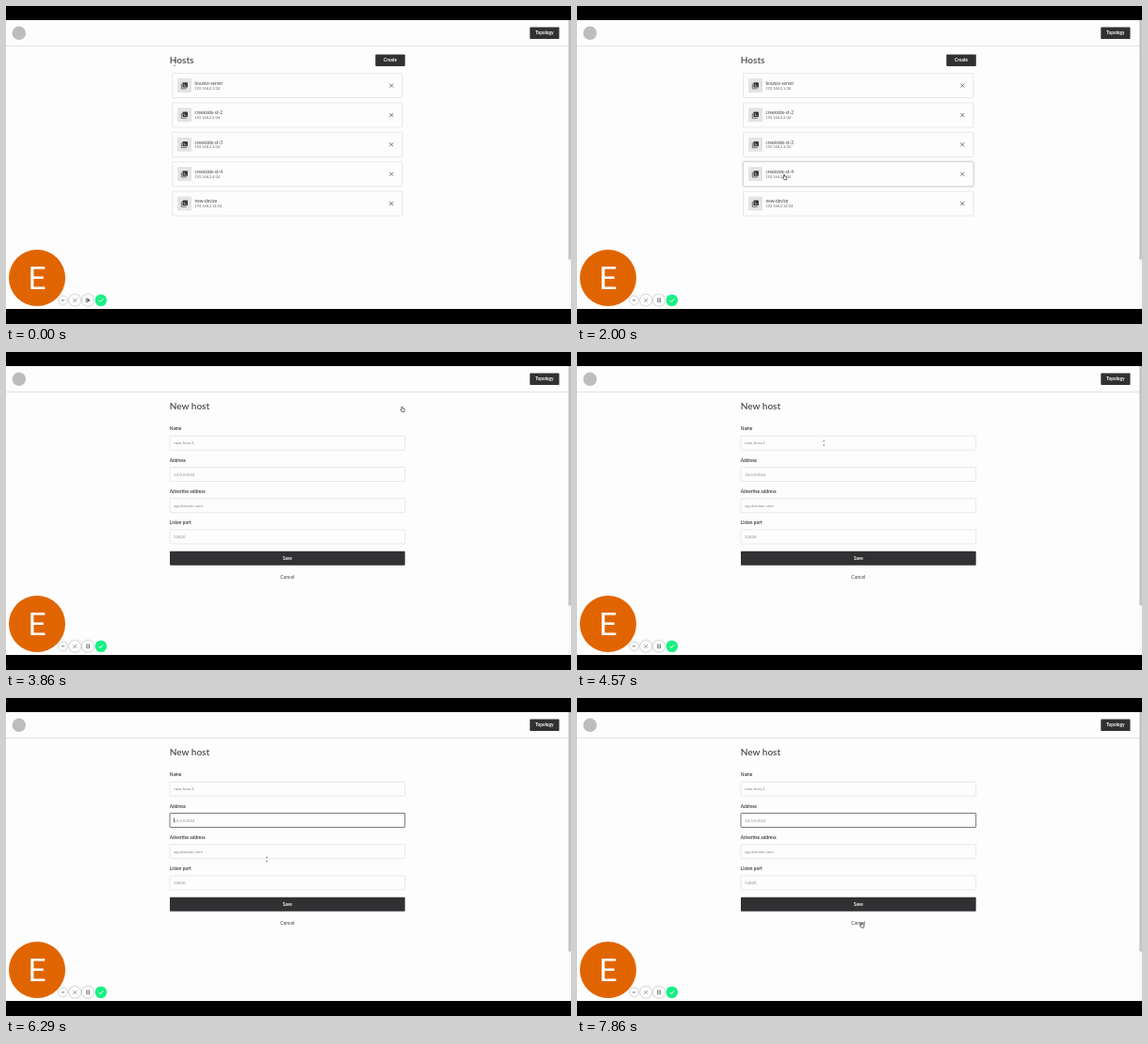
An HTML page that plays this animation: 600x338 px, repeating every 8000 ms.

```html
<!DOCTYPE html>
<html lang="en">
<head>
<meta charset="utf-8">
<title>Host manager</title>
<style>
  html, body { margin: 0; width: 100%; height: 100%; overflow: hidden; background: #000; }
  svg { display: block; width: 600px; height: 338px; }
  text { font: 4.7px Lato, sans-serif; fill: #444; }
  .heading { font-size: 10px; font-weight: 600; fill: #4a4a4c; }
  .sub { font-size: 3.85px; fill: #666; }
  .button { fill: #313032; }
  .caption { font-weight: 700; fill: #fff; text-anchor: middle; }
  .label { font-size: 4.8px; font-weight: 600; fill: #333; }
  .hint { font: 4.4px "Liberation Sans", sans-serif; fill: #858585; }
  .card, .field { fill: #fefdfe; stroke: #e4e4e5; stroke-width: .8; }
  .card.on { stroke: #d2d2d4; filter: drop-shadow(0 .6px .8px #0003); }
  .field.on { stroke: #555; }
  .knob { fill: #fff; filter: drop-shadow(0 .4px 1px #0006); }
  .line { fill: none; stroke: #555; stroke-width: .8; }
</style>
</head>
<body>
<svg id="stage" viewBox="0 0 600 338"></svg>
<script>
const LOOP = 8000, STEP = 1000 / 7;
const CARD_TOP = 71.6, CARD_PITCH = 31.35, CARD_HEIGHT = 26;
const FIELD_TOP = 89.2, FIELD_PITCH = 33.25;

const hosts = [
  ["bounce-server", "192.168.2.1/24"],
  ["creekside-st-2", "192.168.2.2/24"],
  ["creekside-st-3", "192.168.2.3/24"],
  ["creekside-st-4", "192.168.2.4/24"],
  ["new-device", "192.168.2.14/24"],
];
const fields = [
  ["Name", "new-host-1"],
  ["Address", "10.0.0.0/24"],
  ["Advertise address", "wg.domain.com"],
  ["Listen port", "51820"],
];
// Pointer stops: time, x, y
const pointerPath = [
  [0, 179, 61], [140, 179, 61], [1140, 205, 146], [1857, 220.5, 182],
  [2286, 220.5, 182], [2429, 223, 184], [2715, 223, 184], [3429, 421, 61],
  [4143, 421, 61], [4572, 262, 97], [4858, 246, 97], [5143, 246, 97],
  [5429, 246, 128], [5858, 246, 128], [6286, 277, 171.5],
  [7000, 302, 226], [7143, 302.5, 241.5], [8000, 302.5, 241.5],
];

const text = (x, y, cls, str) => `<text x="${x}" y="${y}" class="${cls}">${str}</text>`;
const rect = (x, y, w, h, attrs) => `<rect x="${x}" y="${y}" width="${w}" height="${h}" ${attrs}/>`;
const circle = (x, y, r, attrs) => `<circle cx="${x}" cy="${y}" r="${r}" ${attrs}/>`;
const line = (d, attrs = "") => `<path d="${d}" class="line" ${attrs}/>`;
const button = (x, y, w, h, str) =>
  rect(x, y, w, h, 'rx=".8" class="button"') + text(x + w / 2, y + h / 2 + 1.6, "caption", str);

const card = ([name, address], i) => `<g transform="translate(0 ${CARD_TOP + i * CARD_PITCH})">
  ${rect(176.5, 0, 244.4, CARD_HEIGHT, 'rx=".6" class="card"')}
  ${rect(182, 5.4, 15, 15, 'rx="1" fill="#e4e3e5"')}
  ${rect(187.5, 9.6, 5.4, 5.4, 'rx=".6" fill="#333"')}
  ${line("M186.3 11v5.3h5.4")}
  ${line("M189.3 11.2v2.4h2.2", 'style="stroke:#ddd;stroke-width:.6"')}
  ${text(200.6, 12.3, "", name)}
  ${text(200.6, 17, "sub", address)}
  ${line("M407.3 11l4 4m0-4l-4 4")}
</g>`;

const field = ([label, hint], i) => `<g transform="translate(0 ${FIELD_TOP + i * FIELD_PITCH})">
  ${text(173.8, -5.8, "label", label)}
  ${rect(174, 0, 249.7, 15, 'rx=".6" class="field"')}
  ${text(178.2, 9.2, "hint", hint)}
</g>`;

const controls = `
  ${circle(33, 289, 30, 'fill="#e06500"')}
  <text x="33" y="301" text-anchor="middle" style="font:33.5px Roboto,sans-serif;fill:#fff">E</text>
  ${circle(60.5, 312.8, 4.3, 'class="knob"')}${line("M58.8 312.8h3.4")}
  ${circle(73.2, 312.8, 6, 'class="knob"')}${line("M71.2 310.8l4 4m0-4l-4 4", 'style="stroke:#888"')}
  ${circle(87, 312.8, 6, 'class="knob"')}
  <g id="pause">${line("M85.9 310.3v5m2.3-5v5", 'style="stroke-width:1"')}</g>
  <g id="resume">${line("M85.2 310.3v5")}<path d="M86.3 310.3l3.2 2.5-3.2 2.5z" fill="#555"/></g>
  ${circle(100.8, 312.8, 6.3, 'fill="#19f083"')}
  ${line("M98.6 312.9l1.6 1.6 3-3.3", 'style="stroke:#fff;stroke-width:1"')}`;

const stage = document.getElementById("stage");
stage.innerHTML = `
  ${rect(0, 0, 600, 338, "")}
  ${rect(0, 15, 600, 307, 'fill="#fefdfe"')}
  ${rect(0, 42, 597, 1, 'fill="#e3e3e4"')}
  ${rect(597.3, 15, 2.7, 307, 'fill="#f8f8f8"')}
  ${rect(597.3, 15, 2.7, 254.5, 'fill="#c4c4c5"')}
  ${circle(13.8, 28.8, 7.2, 'fill="#bdbdbd"')}
  ${button(556.3, 22.6, 31.2, 12.4, "Topology")}
  <g id="list">
    ${text(173.8, 61, "heading", "Hosts")}
    ${button(392.3, 51.6, 31.5, 12.3, "Create")}
    ${hosts.map(card).join("")}
  </g>
  <g id="form">
    ${text(173.8, 61, "heading", "New host")}
    ${fields.map(field).join("")}
    ${rect(178.4, 127.2, .6, 5.4, 'id="caret" fill="#333"')}
    ${button(174, 211.8, 249.7, 15, "Save")}
    <text x="298.8" y="241" text-anchor="middle" style="font-size:5.1px">Cancel</text>
  </g>
  ${controls}
  <g id="pointer">
    <path id="hand" d="M-1 -2.6q.6-.6 1.1 0v1.6l2 .5q.5.3.3 1L2 2.6H-.6L-2.2.5q.1-.8 1.2-.1z"
      fill="#fff" stroke="#333" stroke-width=".7"/>
    <path id="beam" class="line" d="M-.9-2.2h1.8M-.9 2.2h1.8"/>
  </g>`;

const part = id => document.getElementById(id);
const show = (id, on) => part(id).style.display = on ? "" : "none";
const cards = stage.querySelectorAll(".card");
const inputs = stage.querySelectorAll(".field");

function pointerAt(t) {
  const next = Math.max(1, pointerPath.findIndex(p => p[0] >= t));
  const [t0, x0, y0] = pointerPath[next - 1], [t1, x1, y1] = pointerPath[next];
  const k = (t - t0) / (t1 - t0);
  return [x0 + (x1 - x0) * k, y0 + (y1 - y0) * k];
}

function draw(now) {
  const t = Math.floor((now % LOOP + 5) / STEP) * STEP % LOOP;
  const [x, y] = pointerAt(t);
  const inForm = t > 3800;
  const focus = t < 4800 ? -1 : t < 5700 ? 0 : 1;
  const beam = t < 300 || (t > 4200 && t < 6600);

  show("list", !inForm);
  show("form", inForm);
  show("resume", t < 1100);
  show("pause", t >= 1100);
  show("hand", !beam);
  show("beam", beam);
  show("caret", t >= 5990 && (t - 5990) % 1000 < 500);
  part("pointer").setAttribute("transform", `translate(${x} ${y})`);
  cards.forEach((el, i) => {
    const offset = y - CARD_TOP - i * CARD_PITCH;
    el.classList.toggle("on", offset > 0 && offset < CARD_HEIGHT && x < 421);
  });
  inputs.forEach((el, i) => el.classList.toggle("on", i === focus));
}

function tick() {
  draw(performance.now());
  requestAnimationFrame(tick);
}
tick();
</script>
</body>
</html>
```
